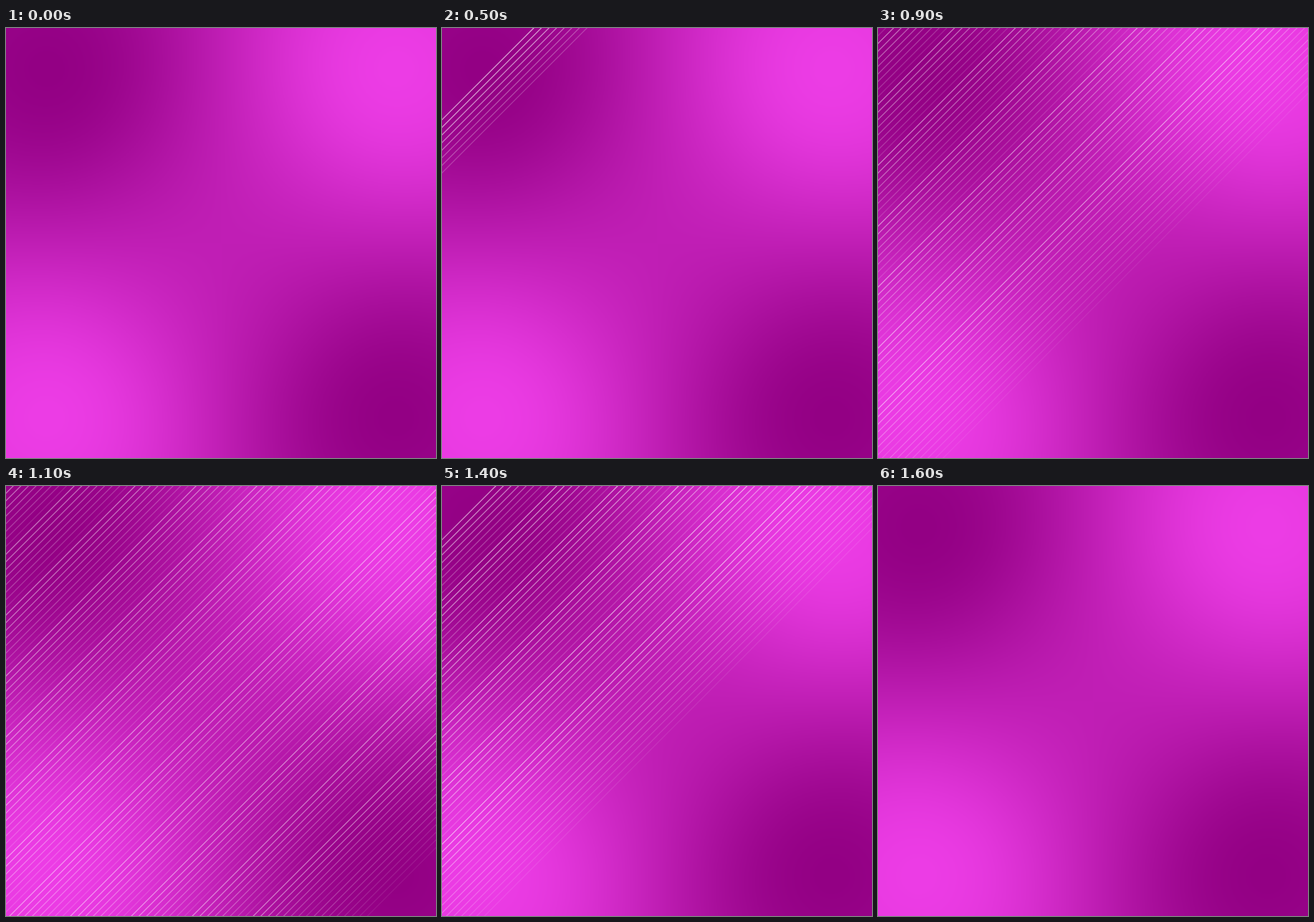
These frames come from a looping animation (600 px wide and 600 px high, 1900 ms). An HTML page with a canvas:

```html
<!DOCTYPE html>
<html lang="en">
<head>
<meta charset="utf-8">
<title>Diagonal line sweep</title>
<style>
  html, body { margin: 0; width: 100%; height: 100%; overflow: hidden; }
  canvas { display: block; }
</style>
</head>
<body>
<canvas id="stage" width="600" height="600"></canvas>
<script>
const SIZE = 600, LOOP = 1900, STEP = 100;
const LINES = 8, GAP = 10.6, PERIOD = 85;
const DARK = [147, 0, 132], BRIGHT = [236, 60, 229];
const ctx = document.getElementById('stage').getContext('2d');

// Four colour points blended by inverse squared distance.
function makeBackground() {
  const image = ctx.createImageData(SIZE, SIZE);
  const near = 57, far = SIZE - near;
  const weight = (x, y, px, py) => 1 / ((x - px) ** 2 + (y - py) ** 2 + 1);
  for (let y = 0, i = 0; y < SIZE; y++) {
    for (let x = 0; x < SIZE; x++, i += 4) {
      const dark = weight(x, y, near, near) + weight(x, y, far, far);
      const bright = weight(x, y, far, near) + weight(x, y, near, far);
      const mix = bright / (dark + bright);
      for (let k = 0; k < 3; k++) {
        image.data[i + k] = Math.round(DARK[k] + (BRIGHT[k] - DARK[k]) * mix);
      }
      image.data[i + 3] = 255;
    }
  }
  return image;
}

// A band of lines x + y = const, fading away from the first one.
function band(start, strength = 1) {
  for (let i = 0; i < LINES; i++) {
    const c = start + i * GAP;
    if (c < 0 || c > 2 * SIZE) continue;
    ctx.globalAlpha = strength * (0.7 - 0.48 * i / (LINES - 1));
    ctx.beginPath();
    ctx.moveTo(-10, c + 10);
    ctx.lineTo(c + 10, -10);
    ctx.stroke();
  }
}

// Bands in a row; the one furthest down-right is faint.
function bands(last, count, strength) {
  for (let k = 0; k < count; k++) {
    band(last - k * PERIOD, k ? strength : strength / 2);
  }
}

const background = makeBackground();

function draw(t) {
  ctx.putImageData(background, 0, 0);
  ctx.strokeStyle = '#fff';
  ctx.lineWidth = 1.2;
  if (t >= 100 && t < 600) band(541 - 2.065 * (t - 300));
  else if (t >= 600 && t < 1300) bands(410 + 2.067 * (t - 800), 18, 0.7);
  else if (t >= 1300 && t < 1600) bands(585 - 3.3 * (t - 1400), 7, 0.9);
  ctx.globalAlpha = 1;
}

function tick() {
  const t = performance.now() % LOOP;
  draw(Math.floor(t / STEP) * STEP);
  requestAnimationFrame(tick);
}
tick();
</script>
</body>
</html>
```
